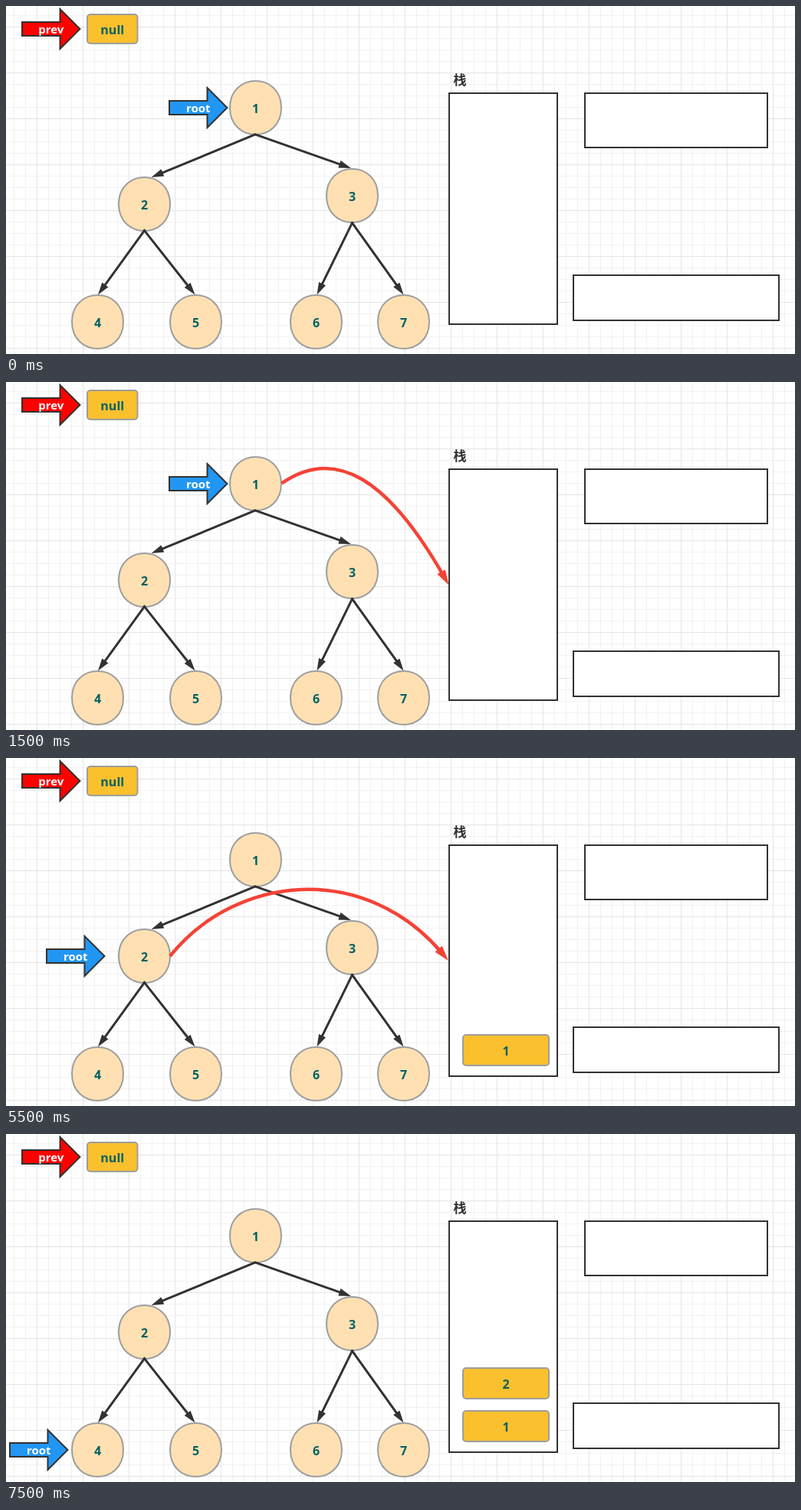
Animation of 1029x455 px, one loop 8000 ms. Source, as an HTML page:

```html
<!DOCTYPE html>
<html lang="zh-CN">
<head>
<meta charset="utf-8">
<title>Tree traversal with a stack</title>
<style>
  html, body { margin: 0; width: 100%; height: 100%; overflow: hidden; background: #fff; }
  svg { display: block; }
  text { font: bold 16px "Open Sans", "Noto Sans", sans-serif; fill: #006064; text-anchor: middle; }
  .tag { font-size: 15px; fill: #fff; }
  .title { font: bold 17px "Noto Sans CJK SC", "Noto Sans CJK", sans-serif; fill: #323232; }
  .frame { fill: #fff; stroke: #323232; stroke-width: 2; }
  .node { fill: #ffe0b2; stroke: #9e9e9e; stroke-width: 2; }
  .cell { fill: #fbc02d; stroke: #9e9e9e; stroke-width: 2; }
  .pointer { stroke: #323232; stroke-width: 2; }
</style>
</head>
<body>
<svg id="stage" width="1029" height="455" viewBox="0 0 1029 455"></svg>
<script>
const DARK = '#323232', RED = '#f44336';
const LOOP = 8000;

const grid = () => {
  let minor = '', major = '';
  for (let x = 10, i = 2; x < 1029; x += 15, i++) {
    const d = `M${x + .5} 0V455`;
    i % 4 ? minor += d : major += d;
  }
  for (let y = 12, i = 3; y < 455; y += 15, i++) {
    const d = `M0 ${y + .5}H1029`;
    i % 4 ? minor += d : major += d;
  }
  return `<path d="${minor}" stroke="#f2f2f2"/><path d="${major}" stroke="#e5e5e5"/>`;
};

const label = (x, y, text, cls = '') => `<text class="${cls}" x="${x}" y="${y}">${text}</text>`;

const frame = (x, y, w, h) => `<rect class="frame" x="${x}" y="${y}" width="${w}" height="${h}"/>`;

const cell = (x, y, w, h, text) =>
  `<rect class="cell" x="${x}" y="${y}" width="${w}" height="${h}" rx="4"/>` +
  label(x + w / 2, y + h / 2 + 6.5, text);

// Squarish circle made of two cubic curves
const node = (x, y, text) => {
  const w = 33.5, k = 140 / 3;
  return `<path class="node" d="M${x - w} ${y}c0 ${-k} ${2 * w} ${-k} ${2 * w} 0s${-2 * w} ${k} ${-2 * w} 0z"/>` +
    label(x, y + 6.5, text);
};

// Block arrow whose left end is at x, centred on y
const pointer = (x, y, text, color) =>
  `<path class="pointer" fill="${color}" d="M${x} ${y - 9}h49.5v-17l26 26l-26 26v-17h-49.5z"/>` +
  label(x + 37.7, y + 5.5, text, 'tag');

// Cubic line with a solid head pointing along its final tangent
const arrow = (x0, y0, ax, ay, bx, by, x, y, color, width, len, half) => {
  const d = Math.hypot(x - bx, y - by), ux = (x - bx) / d, uy = (y - by) / d;
  const cut = len * .6, px = x - ux * len, py = y - uy * len;
  const curve = `M${x0} ${y0}C${ax} ${ay} ${bx - ux * cut} ${by - uy * cut} ${x - ux * cut} ${y - uy * cut}`;
  const head = `M${x} ${y}L${px - uy * half} ${py + ux * half}L${px + uy * half} ${py - ux * half}z`;
  return `<path d="${curve}" fill="none" stroke="${color}" stroke-width="${width}"/><path d="${head}" fill="${color}"/>`;
};

const edge = (x0, y0, x, y) => arrow(x0, y0, x0, y0, x0, y0, x, y, DARK, 3, 16, 5);
const push = (...pts) => arrow(...pts, RED, 4.5, 20, 6);

const nodes = [[325.5, 133], [180.5, 259], [451.5, 248], [119.5, 413], [247.5, 413], [404.5, 413], [518.5, 413]];
const edges = [
  [325, 168, 189.5, 224], [325, 168, 450, 212],
  [180.5, 293.5, 120, 377.5], [180.5, 293.5, 246.5, 377.5],
  [451.5, 283.5, 405.5, 377.5], [451.5, 283.5, 518.5, 377.5]
];
const root = (x, y) => pointer(x, y, 'root', '#2196f3');

// Each part is shown from its start to its end time
const parts = [
  [0, 4500, root(213, 133)],
  [4500, 7500, root(53, 259)],
  [7500, LOOP, root(5, 413)],
  [500, 1500, cell(191, 49, 168, 41, 'root != null')],
  [1500, 2500, push(359.5, 132.5, 429, 84, 504, 136, 577.5, 265.5)],
  [2500, LOOP, cell(596, 362, 112, 40, '1')],
  [5500, 6500, push(214, 259, 300, 152, 475, 144, 577, 265)],
  [6500, LOOP, cell(596, 306, 112, 40, '2')]
];

const stage = document.getElementById('stage');
stage.innerHTML = grid() +
  frame(578, 114, 141, 302) + frame(755, 114, 238, 71) + frame(740, 352, 268, 59) +
  label(592, 103, '栈', 'title') +
  pointer(21, 30, 'prev', '#f00') + cell(106, 11, 65.5, 38, 'null') +
  nodes.map(([x, y], i) => node(x, y, i + 1)).join('') +
  edges.map(e => edge(...e)).join('') +
  parts.map(p => `<g class="part">${p[2]}</g>`).join('');

const groups = stage.querySelectorAll('.part');
const draw = () => {
  const t = performance.now() % LOOP;
  parts.forEach(([start, end], i) => {
    groups[i].style.display = t >= start && t < end ? '' : 'none';
  });
  requestAnimationFrame(draw);
};
draw();
</script>
</body>
</html>
```
